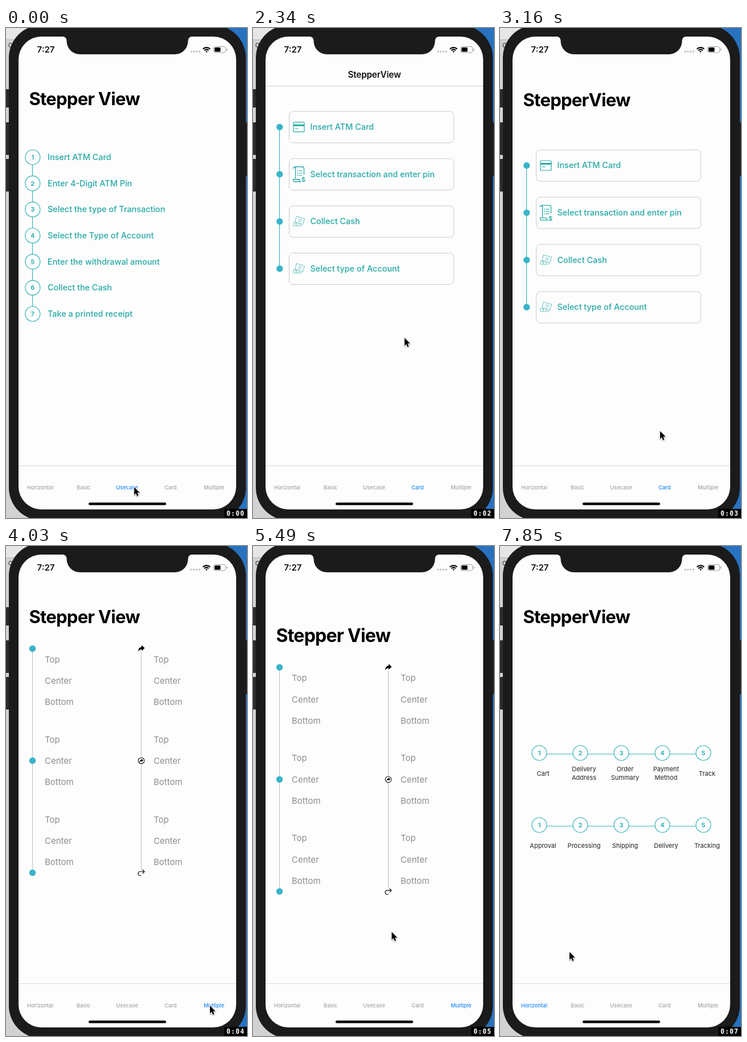
An HTML page with a canvas for the animation above (8000 ms loop, 423x857 px).

```html
<!DOCTYPE html>
<html lang="en">
<head>
<meta charset="utf-8">
<title>Stepper demo</title>
<style>
html, body { margin: 0; width: 100%; height: 100%; overflow: hidden; background: #1b1b1b; }
canvas { display: block; width: 423px; height: 857px; }
</style>
</head>
<body>
<canvas id="stage"></canvas>
<script>
const W = 423, H = 857, LOOP = 8000;
const canvas = document.getElementById('stage');
const dpr = window.devicePixelRatio || 1;
canvas.width = W * dpr;
canvas.height = H * dpr;
const c = canvas.getContext('2d');

const FONT = 'Inter, Roboto, sans-serif';
const PAPER = '#fdfdfd', TEAL = '#26a9a5', RING = '#35b3b6', DOT = '#3ab4c9', BODY = '#1b1b1b';
const TABS = ['Horizontal', 'Basic', 'Usecase', 'Card', 'Multiple'];

// Pointer moves: start, end, x, y of the goal
const HOME = { x: 224, y: 802 };
const MOVES = [
  [200, 410, 285, 800], [990, 1340, 274, 640], [1400, 1760, 268, 704], [1820, 2340, 265, 541],
  [2680, 3160, 280, 704], [3180, 3640, 357, 803], [4290, 4560, 345, 655], [4570, 4890, 344, 563],
  [5100, 5900, 134, 793], [6710, 7120, 57, 803], [7620, 7850, 121, 709]
];

// Grab and release times; drags fold and unfold the title in turn
const DRAGS = [[1400, 2400], [2680, 2980], [4570, 4900], [5100, 5700]];
const FOLD = -48, SETTLE = 70;

const clamp = v => Math.max(0, Math.min(1, v));
const smooth = p => p * p * (3 - 2 * p);

function pointerAt(t) {
  let { x, y } = HOME;
  for (const [start, end, goalX, goalY] of MOVES) {
    const p = smooth(clamp((t - start) / (end - start)));
    x += (goalX - x) * p;
    y += (goalY - y) * p;
  }
  return { x, y };
}

// Past either end the page follows the finger only in part
function rubber(v) {
  if (v > 0) return v * 0.52;
  return v < FOLD ? FOLD + (v - FOLD) * 0.33 : v;
}

function scrollAt(t) {
  const i = DRAGS.filter(([grab]) => t >= grab).length - 1;
  if (i < 0) return 0;
  const [grab, release] = DRAGS[i];
  const [from, to] = i % 2 ? [FOLD, 0] : [0, FOLD];
  const held = rubber(from + pointerAt(Math.min(t, release)).y - pointerAt(grab).y);
  return t < release ? held : to + (held - to) * Math.exp((release - t) / SETTLE);
}

function text(str, x, y, size, weight, color, align = 'left', spacing = 0, family = FONT) {
  c.font = `${weight} ${size}px ${family}`;
  c.letterSpacing = spacing + 'px';
  c.textAlign = align;
  c.fillStyle = color;
  c.fillText(str, x, y);
}

function box(x, y, w, h, r) {
  c.beginPath();
  c.roundRect(x, y, w, h, r);
}

function rect(x, y, w, h, color) {
  c.fillStyle = color;
  c.fillRect(x, y, w, h);
}

function line(x1, y1, x2, y2, color, width = 1.2) {
  c.beginPath();
  c.moveTo(x1, y1);
  c.lineTo(x2, y2);
  c.strokeStyle = color;
  c.lineWidth = width;
  c.stroke();
}

function poly(points) {
  c.beginPath();
  points.forEach(([x, y]) => c.lineTo(x, y));
  c.closePath();
}

function disc(x, y, r, color) {
  c.beginPath();
  c.arc(x, y, r, 0, Math.PI * 2);
  c.fillStyle = color;
  c.fill();
}

function ring(x, y, r, color, width) {
  c.beginPath();
  c.arc(x, y, r, 0, Math.PI * 2);
  c.strokeStyle = color;
  c.lineWidth = width;
  c.stroke();
}

function at(x, y, draw, scale = 1) {
  c.save();
  c.translate(x, y);
  c.scale(scale, scale);
  draw();
  c.restore();
}

function numberRing(x, y, n) {
  disc(x, y, 13, PAPER);
  ring(x, y, 13, RING, 1.2);
  text(n, x, y + 4, 11, 700, RING, 'center');
}

const dot = (x, y) => disc(x, y, 5.7, DOT);
const label = (str, x, y) => text(str, x, y + 5, 14.4, 500, TEAL);

// Icons, centred on the origin
function cardIcon() {
  c.strokeStyle = TEAL;
  c.lineWidth = 1.2;
  box(-9.5, -8.5, 19, 17, 2);
  c.stroke();
  rect(-9.5, -4.5, 19, 3, TEAL);
  line(-6.5, 2.5, -1, 2.5, TEAL, 1);
}

function receiptIcon() {
  c.strokeStyle = TEAL;
  c.lineWidth = 1.3;
  c.beginPath();
  c.moveTo(-6, 8);
  c.lineTo(-6, -10);
  c.arc(-8, -10, 2.2, 0, Math.PI, true);
  c.moveTo(-8, -13);
  c.lineTo(6, -13);
  c.quadraticCurveTo(9, -13, 9, -10);
  c.lineTo(9, 1);
  c.moveTo(3, 13);
  c.lineTo(-8, 13);
  c.quadraticCurveTo(-10, 13, -10, 9);
  c.lineTo(1, 9);
  c.quadraticCurveTo(1, 13, 4, 13);
  c.stroke();
  for (let y = -6; y < 5; y += 4) {
    rect(-3, y - 1, 1.6, 1.6, TEAL);
    line(0, y, 6, y, TEAL);
  }
  text('$', 8, 13.5, 11, 600, TEAL, 'center');
}

function cashIcon() {
  c.globalAlpha = 0.8;
  c.strokeStyle = TEAL;
  c.lineWidth = 0.9;
  poly([[-4, -9], [10, -5], [7, 5], [-7, 1]]);
  c.stroke();
  ring(2, -2, 2.2, TEAL, 0.8);
  for (const x of [-7, -2]) {
    disc(x, 5, 3, PAPER);
    ring(x, 5, 3, TEAL, 0.9);
  }
  line(1, 8.5, 6, 6, TEAL, 0.9);
  c.globalAlpha = 1;
}

function solidArrow() {
  c.beginPath();
  c.moveTo(6, -1);
  c.lineTo(0.5, -6);
  c.lineTo(0.5, -3);
  c.quadraticCurveTo(-5.5, -2.5, -5.5, 5.5);
  c.quadraticCurveTo(-3.5, 1.3, 0.5, 1.3);
  c.lineTo(0.5, 4);
  c.closePath();
  c.fillStyle = '#000';
  c.fill();
}

function hookArrow() {
  c.beginPath();
  c.moveTo(2, -5.5);
  c.lineTo(5.5, -2);
  c.lineTo(2, 1.5);
  c.moveTo(5.5, -2);
  c.lineTo(-2, -2);
  c.arc(-2, 1.5, 3.5, -Math.PI / 2, Math.PI / 2, true);
  c.lineTo(0, 5);
  c.strokeStyle = '#111';
  c.lineWidth = 1.2;
  c.stroke();
}

// Pages
function stepList(steps, mark, color) {
  const y = i => 226 + i * 45.67;
  line(46.5, y(0), 46.5, y(steps.length - 1), color);
  steps.forEach((s, i) => {
    mark(46.8, y(i), i + 1);
    label(s, 73, y(i));
  });
}

const usecase = () => stepList(['Insert ATM Card', 'Enter 4-Digit ATM Pin',
  'Select the type of Transaction', 'Select the Type of Account', 'Enter the withdrawal amount',
  'Collect the Cash', 'Take a printed receipt'], numberRing, RING);

const basic = () => stepList(['Insert ATM Card', 'Enter 4-Digit ATM Pin', 'Collect the Cash',
  'Take a printed receipt'], dot, DOT);

function cards() {
  const steps = [['Insert ATM Card', cardIcon], ['Select transaction and enter pin', receiptIcon],
    ['Collect Cash', cashIcon], ['Select type of Account', cashIcon]];
  const top = 238, gap = 82.6;
  line(46.5, top, 46.5, top + 3 * gap, DOT);
  steps.forEach(([s, icon], i) => {
    const y = top + i * gap;
    dot(46.8, y);
    box(63.5, y - 27.3, 289, 55, 7);
    c.strokeStyle = '#c9c9c9';
    c.lineWidth = 1;
    c.stroke();
    at(80.5, y, icon);
    label(s, 100.5, y);
  });
}

function multiple() {
  const top = 179.5, gap = 196;
  for (const x of [46.5, 237.5]) {
    line(x, top, x, top + 2 * gap, '#c4c4c4');
    for (let i = 0; i < 3; i++) {
      ['Top', 'Center', 'Bottom'].forEach((s, j) =>
        text(s, x + 21.5, top + 24 + i * 140 + j * 37.4, 15, 400, '#8d8d8d'));
    }
  }
  for (let i = 0; i < 3; i++) {
    dot(46.5, top + i * gap);
    disc(237.5, top + i * gap, 6, PAPER);
  }
  at(237.5, top, solidArrow);
  ring(237.5, top + gap, 5.3, '#111', 1.1);
  at(237.5, top + gap, solidArrow, 0.58);
  at(237.5, top + 2 * gap, hookArrow);
}

function stepRow(y, names) {
  line(69, y + 2, 357, y + 2, RING);
  names.forEach((name, i) => {
    const x = 69 + i * 72, words = name.split(' ');
    numberRing(x, y, i + 1);
    words.forEach((w, j) =>
      text(w, x + 6.5, y + 39.5 + (j - (words.length - 1) / 2) * 15, 11, 400, '#222', 'center'));
  });
}

function horizontal() {
  stepRow(362, ['Cart', 'Delivery Address', 'Order Summary', 'Payment Method', 'Track']);
  stepRow(488, ['Approval', 'Processing', 'Shipping', 'Delivery', 'Tracking']);
}

// Start time, tab, title, page
const PAGES = [
  [0, 2, 'Stepper View', usecase],
  [990, 3, 'StepperView', cards],
  [4030, 4, 'Stepper View', multiple],
  [5980, 1, 'Stepper View', basic],
  [7430, 0, 'StepperView', horizontal]
];

function desktop() {
  rect(0, 0, W, H, '#2873c0');
  rect(0, 0, 210, H, '#d2d2d2');
  rect(0, 0, 60, 20, '#e6e6e6');
  rect(0, 20, 60, 1, '#b5b5b5');
  text('C', 4, 34, 10, 500, '#333');
  c.fillStyle = BODY;
  box(5, -5, 416, 866, 57);
  c.fill();
  for (const [y, h] of [[107, 32], [165, 57], [229, 57]]) rect(0, y, 5, h, '#2b2b2b');
  rect(421, 165, 2, 94, '#222');
}

function notch() {
  c.beginPath();
  c.moveTo(99, 14);
  c.lineTo(99, 15);
  c.arcTo(106.5, 15, 106.5, 22, 7);
  c.arcTo(106.5, 46, 130, 46, 23);
  c.arcTo(319.5, 46, 319.5, 22, 23);
  c.arcTo(319.5, 15, 327, 15, 7);
  c.lineTo(327, 14);
  c.closePath();
  c.fillStyle = BODY;
  c.fill();
}

function statusBar() {
  text('7:27', 54.5, 43, 15, 600, '#111');
  for (let i = 0; i < 4; i++) disc(325 + i * 4.7, 41.3, 1.7, '#c6c6c6');
  c.strokeStyle = '#000';
  c.lineWidth = 2.2;
  for (const r of [1.5, 5.3, 8.9]) {
    c.beginPath();
    c.arc(352, 43, r, -Math.PI * 0.75, -Math.PI * 0.25);
    c.stroke();
  }
  c.strokeStyle = '#9a9a9a';
  c.lineWidth = 1;
  box(364.5, 32.5, 21, 10.5, 3);
  c.stroke();
  c.fillStyle = '#000';
  box(366, 34, 10.5, 7.5, 1.5);
  c.fill();
  rect(387, 36, 1.3, 3.5, '#9a9a9a');
}

function navBar(title, off) {
  c.save();
  if (off < 0) {
    c.beginPath();
    c.rect(22, 102, 382, 640);
    c.clip();
  }
  const grow = 1 + Math.max(0, off) / 1000;
  at(40.5, 135 + off, () => text(title, 0, 0, 31, 700, '#000', 'left', -0.75), grow);
  c.restore();
  c.globalAlpha = clamp((-off - 36) / 10);
  text(title, 213, 87, 15.3, 600, '#111', 'center', -0.2);
  c.globalAlpha = clamp((-off - 49) / 6);
  rect(22, 101, 382, 1.2, '#d0d0d0');
  c.globalAlpha = 1;
}

function tabBar(active) {
  rect(22, 765, 382, 1, '#d9d9d9');
  TABS.forEach((s, i) =>
    text(s, 60 + i * 76.3, 807, 9.3, 500, i === active ? '#1a87f7' : '#a3a3a3', 'center', 0.05));
  c.fillStyle = '#000';
  box(145, 830, 136, 4.5, 2.2);
  c.fill();
}

function arrow() {
  poly([[0, 0], [0, 15.5], [3.5, 12.2], [5.8, 17.8], [8.5, 16.7], [6.2, 11.2], [11, 11.2]]);
  c.lineJoin = 'round';
  c.strokeStyle = '#fff';
  c.lineWidth = 2;
  c.shadowColor = 'rgba(0,0,0,.4)';
  c.shadowBlur = 2;
  c.shadowOffsetY = 1;
  c.stroke();
  c.shadowColor = 'transparent';
  c.fillStyle = '#000';
  c.fill();
}

function clock(t) {
  rect(383, 841, 40, 16, '#000');
  text('0:0' + Math.floor(t / 1000), 387, 852.5, 11.5, 700, '#fff', 'left', 1.1,
    '"DejaVu Sans Mono", monospace');
}

function draw(t) {
  const [, tab, title, page] = PAGES.filter(p => t >= p[0]).pop();
  const off = scrollAt(t), { x, y } = pointerAt(t);
  c.setTransform(dpr, 0, 0, dpr, 0, 0);
  desktop();
  c.save();
  box(22, 15, 382, 827, 40);
  c.fillStyle = PAPER;
  c.fill();
  c.clip();
  at(0, off, page);
  navBar(title, off);
  statusBar();
  tabBar(tab);
  c.restore();
  notch();
  at(x + 1, y + 1, arrow, 0.88);
  clock(t);
}

const start = performance.now();
function frame() {
  draw((performance.now() - start) % LOOP);
  requestAnimationFrame(frame);
}
frame();
</script>
</body>
</html>
```
